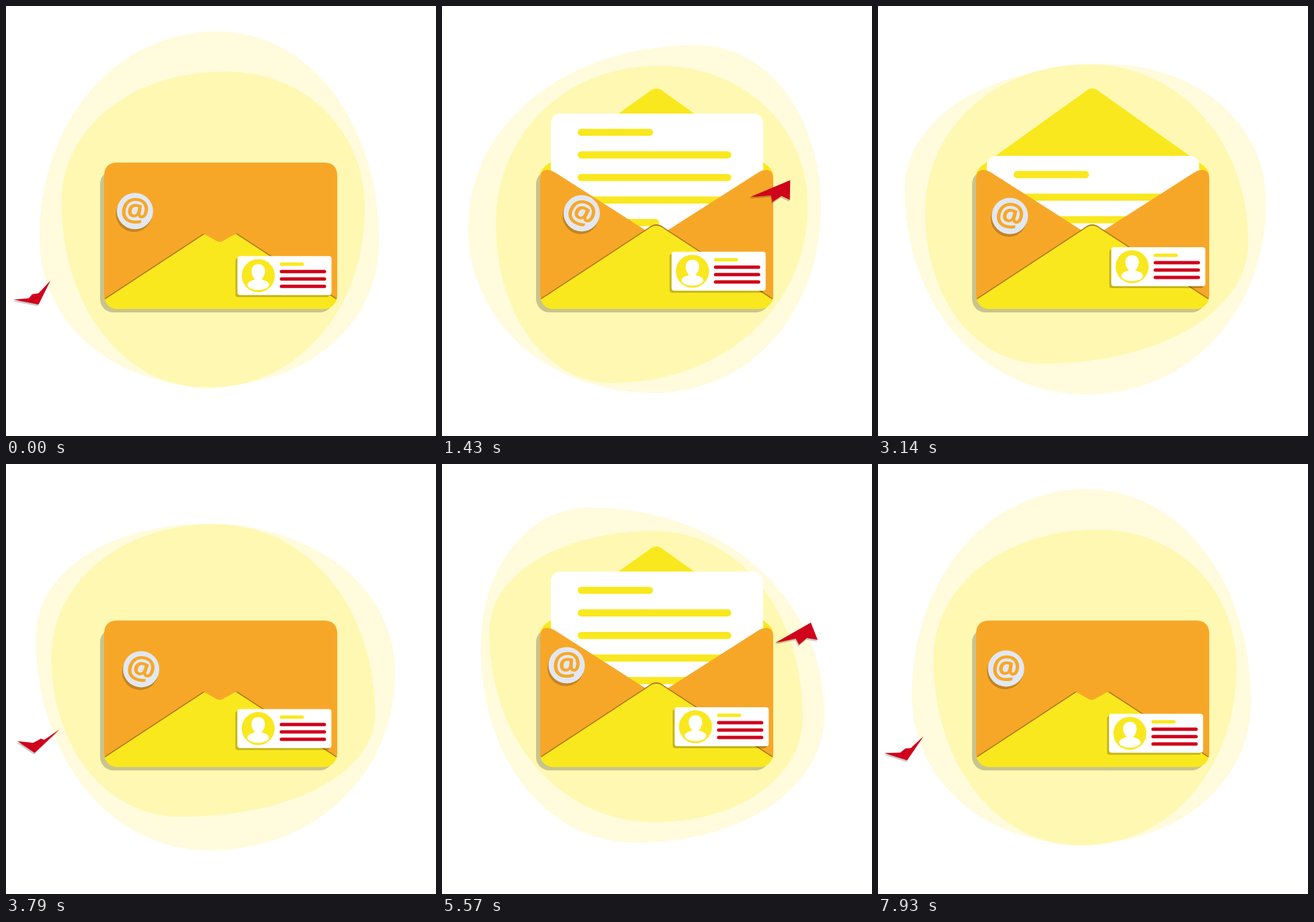
Write an HTML page that moves like this. It is 640 by 640 pixels and loops after 8000 ms.

```html
<!DOCTYPE html>
<html lang="en">
<head>
<meta charset="utf-8">
<title>Mail</title>
<style>
html, body { margin: 0; width: 100%; height: 100%; overflow: hidden; background: #fff; }
svg { display: block; width: 100%; height: 100%; }
.yellow { fill: #f9e81e; }
.orange { fill: #f7a728; }
.white { fill: #fff; }
.shade { fill: #000; fill-opacity: .21; }
.line { stroke: #f9e81e; stroke-width: 10.6; stroke-linecap: round; }
.row { stroke: #d0021b; stroke-width: 5; stroke-linecap: round; }
.at { font: 700 48px "Open Sans", "Noto Sans", sans-serif; text-anchor: middle; }
</style>
</head>
<body>
<svg viewBox="0 0 640 640">
  <defs>
    <path id="pocket" d="M147 437L307 332Q319 322 331 332L492 437Q487 451 472 451H166Q152 451 147 437Z"/>
    <path id="side" d="M146 258Q146 244 156 244Q162 244 167 247L330 351L147 437H146Z"/>
    <clipPath id="body"><rect x="146" y="225" width="347" height="226" rx="20"/></clipPath>
  </defs>
  <path id="outer" fill="#fffbdc"/>
  <path id="inner" fill="#fff8b2"/>
  <g id="behind"></g>

  <rect class="shade" x="140" y="245" width="347" height="211" rx="20"/>
  <rect class="yellow" x="146" y="242" width="347" height="209" rx="20"/>
  <path id="flapOpen" class="yellow"/>
  <g id="letter">
    <rect class="white" x="162" width="316" height="200" rx="14"/>
  </g>
  <g clip-path="url(#body)">
    <use href="#side" class="orange"/>
    <use href="#side" class="orange" transform="matrix(-1 0 0 1 639 0)"/>
    <use href="#pocket" fill="#b17a1c" y="-2"/>
    <use href="#pocket" class="yellow"/>
  </g>
  <path id="flapShut" class="orange"/>

  <g id="badge">
    <circle class="shade" cx="-1.5" cy="4" r="27"/>
    <circle r="27" fill="#e1e8f3"/>
    <text id="at" class="at orange" y="15">@</text>
  </g>
  <g id="card">
    <rect class="shade" x="-3" y="3" width="140" height="58" rx="4"/>
    <rect class="white" width="140" height="58" rx="4"/>
    <circle class="yellow" cx="31" cy="29" r="24.6"/>
    <path class="white" d="M31 12C38 12 41 17 41 22C41 28 38 32 36 34V37H26V34C24 32 21 28 21 22C21 17 24 12 31 12Z"/>
    <ellipse class="white" cx="31" cy="42.5" rx="16" ry="8"/>
    <path class="row" style="stroke:#f9e81e" d="M65.5 12H96.5"/>
    <path class="row" d="M65.5 23H129.5M65.5 34H129.5M65.5 45H129.5"/>
  </g>
  <g id="front">
    <g id="plane">
      <polygon class="shade" transform="translate(-1 2.5)"/>
      <polygon fill="#d0021b"/>
    </g>
  </g>
</svg>
<script>
const LOOP = 8000, HALF = 4000;
const $ = id => document.getElementById(id);

const clamp = x => Math.max(0, Math.min(1, x));
const mix = (a, b, u) => a + (b - a) * u;
const mixPoint = (p, q, u) => p.map((v, k) => mix(v, q[k], u));
const ease = x => x < .5 ? 4 * x ** 3 : 1 - 4 * (1 - x) ** 3;
const step = (t, start, length) => ease(clamp((t - start) / length));

// Cosine swing around a mean, highest where n turns reach the peak angle.
const waveAt = turn => (mean, size, peak, n = 1) =>
  mean + size * Math.cos((n * turn * 360 - peak) * Math.PI / 180);

// Closed curve through its four outermost points.
function blob(top, right, bottom, left) {
  const k = .57;
  const arc = (p, q, flat) => {
    const corner = flat ? [q[0], p[1]] : [p[0], q[1]];
    return "C" + [mixPoint(p, corner, k), mixPoint(q, corner, k), q];
  };
  return "M" + top + arc(top, right, true) + arc(right, bottom, false) +
    arc(bottom, left, true) + arc(left, top, false) + "Z";
}

function drawBlobs(w) {
  $("outer").setAttribute("d", blob(
    [w(300, 82, 80), w(63, 26, 165)],
    [w(567, 12, 170), w(335, 50, 290)],
    [w(302, 15, 85), w(570, 9, 115)],
    [w(48, 11, 280), w(300, 47, 15)]
  ));
  $("inner").setAttribute("d", blob(
    [w(319, 8, 0), w(94, 8, 295)],
    [w(541, 10, 135), w(339, 47, 215)],
    [w(283, 45, 292), w(546, 23, 15)],
    [w(75, 8, 15), w(287, 38, 82)]
  ));
}

function drawFloats(w) {
  const x = w(195, 11, 140, 3) + w(0, 7, 40);
  const y = w(304, 8, 95) + w(0, 3, 50, 3);
  $("badge").setAttribute("transform", `translate(${x} ${y})`);
  $("at").setAttribute("transform", `rotate(${x - 185})`);
  const cardX = w(343.5, 3.8, 75, 3);
  const cardY = w(364.3, 6.5, 40, 2) + w(0, 3, 0);
  $("card").setAttribute("transform", `translate(${cardX} ${cardY})`);
}

function drawFlap(t) {
  const open = step(t, 200, 470) - step(t, 3290, 450);
  const tip = mix(351, 121, open);
  const up = Math.min(tip, 236);
  const slope = (243 - up) / 165;
  const shoulder = up + 3 + 5 * slope;
  $("flapOpen").setAttribute("d",
    `M146 262V253Q146 245 154 238L308 ${shoulder}Q319 ${up - 3} 330 ${shoulder}L485 238Q493 245 493 253V262Z`);
  const f = clamp((tip - 233) / 118), r = 20 * f, low = 233 + 24 * f;
  $("flapShut").style.display = tip > 236 ? "" : "none";
  $("flapShut").setAttribute("d",
    `M146 ${low}V${233 + r}Q146 233 ${146 + r} 233H${493 - r}Q493 233 493 ${233 + r}V${low}` +
    `L322 ${tip - 1}Q318 ${tip + 1} 314 ${tip - 1}Z`);
}

const lines = Array.from({ length: 5 }, (_, i) => {
  const line = document.createElementNS("http://www.w3.org/2000/svg", "line");
  const y = 28 + i * 33.6;
  line.setAttribute("class", "line");
  line.setAttribute("x1", 207.3);
  line.setAttribute("y1", y);
  line.setAttribute("y2", y);
  $("letter").append(line);
  return line;
});

function drawLetter(t) {
  const rise = step(t, 700, 450) - step(t, 2850, 450);
  $("letter").setAttribute("transform", `translate(0 ${mix(236.4, 160, rise)})`);
  lines.forEach((line, i) => {
    const grown = t < 3400 ? step(t, 750 + i * 120, 400) : 0;
    line.style.display = grown ? "" : "none";
    line.setAttribute("x2", 207.3 + grown * (i ? 218 : 101.5));
  });
}

// The plane circles the envelope, turning and banking once per lap.
function drawPlane(t, w) {
  const x = w(308, -270, -3), y = w(319, 112, 22);
  const wingX = w(0, -32, -30), wingY = w(0, 20, 45);
  const stretch = w(0, 1, 50) ** 6;
  const nose = [x + w(0, 48, 78), y + w(0, 28, -40)];
  const wings = [[x + wingX, y + wingY], [x - wingX, y - wingY]];
  const keel = [x + 4 - 47 * stretch, y + 5 + 17 * stretch];
  const notches = wings.map(wing => mixPoint(mixPoint(wing, keel, .65), nose, .25));
  const points = [nose, wings[0], notches[0], keel, notches[1], wings[1]].join(" ");
  for (const shape of $("plane").children) shape.setAttribute("points", points);
  const layer = $(t > 2150 && t < 3850 ? "behind" : "front");
  if ($("plane").parentNode !== layer) layer.append($("plane"));
}

function render(t) {
  const half = t % HALF;
  const slow = waveAt(t / LOOP);
  drawBlobs(slow);
  drawFloats(slow);
  drawFlap(half);
  drawLetter(half);
  drawPlane(half, waveAt(half / HALF));
}

const start = performance.now();
function frame() {
  render((performance.now() - start) % LOOP);
  requestAnimationFrame(frame);
}
frame();
</script>
</body>
</html>
```
